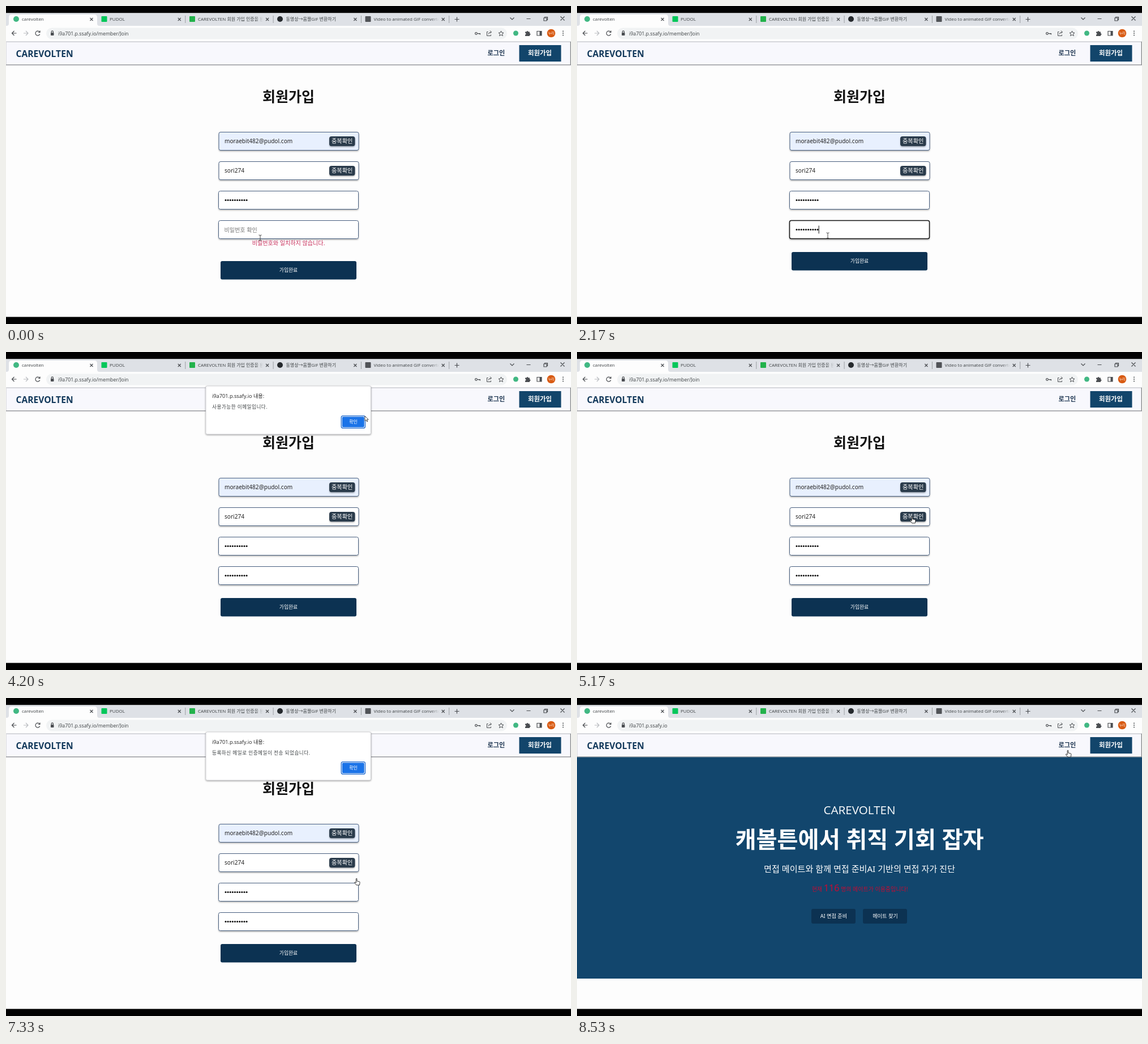
Write an HTML page that moves like this. It is 998 px wide and 561 px high and loops after 8.56 s.

```html
<!DOCTYPE html>
<html lang="ko">
<head>
<meta charset="utf-8">
<title>carevolten</title>
<style>
html, body { margin: 0; width: 100%; height: 100%; overflow: hidden; background: #000; }
svg { display: block; width: 998px; height: 561px; }
text { font-family: "Noto Sans", "Noto Sans CJK KR", "Noto Sans CJK", sans-serif; white-space: pre; }
.ui { font-family: "Open Sans", "Noto Sans CJK KR", "Noto Sans CJK", sans-serif; fill: #3c4043; }
.brand { font-family: "Open Sans", sans-serif; }
.mid { text-anchor: middle; }
.bold { font-weight: 600; }
.white { fill: #fff; }
.icon { fill: none; stroke: #4a4d51; stroke-width: 1.2; }
.field { stroke: #4a6180; stroke-width: 1; }
.focus { stroke: #161616; stroke-width: 1.5; }
</style>
</head>
<body>
<svg viewBox="0 0 998 561">
  <defs>
    <linearGradient id="fade"><stop offset="0" stop-color="#dee1e6" stop-opacity="0"/><stop offset="1" stop-color="#dee1e6"/></linearGradient>
    <filter id="soft" x="-10%" y="-20%" width="120%" height="150%"><feDropShadow dx="0" dy="1.5" stdDeviation=".9" flood-opacity=".3"/></filter>
    <filter id="lift" x="-10%" y="-20%" width="120%" height="150%"><feDropShadow dx="0" dy="1" stdDeviation="1.6" flood-opacity=".45"/></filter>
    <clipPath id="page"><rect y="62" width="998" height="486.500"/></clipPath>
  </defs>
  <rect width="998" height="561"/>
  <rect y="12.500" width="998" height="536" fill="#fdfdfd"/>

  <g id="chrome">
    <rect y="12.500" width="998" height="22.500" fill="#dee1e6"/>
    <path d="M1 35q4 0 4-4V20q0-5 5-5H156q5 0 5 5V31q0 4 4 4z" fill="#fdfdfd"/>
    <g id="tabs"></g>
    <path class="icon" d="M792.500 23.500h8M796.500 19.500v8"/>
    <path class="icon" d="M890.500 20.500l3.500 3.500 3.500-3.500M919.500 22.500h7M950 21h5v5h-5zM951.500 21v-1.500h5v5H955M979.500 18.500l7 7m0-7l-7 7"/>
    <rect x="71" y="38.500" width="814" height="20" rx="10" fill="#f1f3f4"/>
    <path class="icon" d="M18.500 48h-8m4-4l-4 4 4 4"/>
    <path class="icon" d="M31 48h8m-4-4l4 4-4 4" style="stroke:#b9bcc0"/>
    <path class="icon" d="M59.500 46a4 4 0 1 0 .3 3.500M60 43.500v3h-3"/>
    <rect x="79" y="47" width="5.500" height="5" rx=".7" fill="#4a4d51"/>
    <path class="icon" d="M80.200 47v-1.500a1.600 1.600 0 0 1 3.200 0V47"/>
    <text id="url" class="ui" x="92" y="52" font-size="8.800"></text>
    <g class="icon">
      <circle cx="830.500" cy="48.500" r="1.900"/>
      <path d="M832.500 48.500h5v2m-2-2v1.500"/>
      <path d="M851.500 45.500h-2v7h7v-2M852 50q.5-4 5-4m-2-2.500l2.500 2.500-2.500 2.500" stroke-width="1"/>
      <path d="M874.500 44l1.300 3 3.200.3-2.400 2.100.8 3.200-2.900-1.700-2.900 1.700.8-3.200-2.400-2.100 3.200-.3z" stroke-width="1"/>
      <path d="M938 44.500h8v7.500h-8z"/>
    </g>
    <circle cx="900.500" cy="48" r="4.500" fill="#41b883"/>
    <path d="M917 45.500h2.500a1.500 1.500 0 0 1 3 0H925v2.800a1.500 1.500 0 0 1 0 3v1.700h-8v-2.500a1.500 1.500 0 0 0 0-3z" fill="#4a4d51"/>
    <path d="M942.500 44.500H946V52h-3.500z" fill="#4a4d51"/>
    <circle cx="963" cy="48" r="7.300" fill="#d85a12"/>
    <text class="mid white" x="963" y="50.200" font-size="5.800">누리</text>
    <g fill="#4a4d51"><circle cx="984" cy="44.500" r="1"/><circle cx="984" cy="48" r="1"/><circle cx="984" cy="51.500" r="1"/></g>
  </g>

  <g clip-path="url(#page)">
    <rect y="62.500" width="998" height="42" fill="#f8f8fd"/>
    <path d="M0 63.200H998" stroke="#c2c3c8" stroke-width="1.200"/>
    <path d="M.5 63v40" stroke="#dcdce0"/>
    <path d="M0 103.800H997.300V63" fill="none" stroke="#86888b" stroke-width="1.300"/>
    <text class="brand" x="17.500" y="90" font-size="15.600" font-weight="700" fill="#143a5c">CAREVOLTEN</text>
    <text class="bold" x="850.500" y="87" font-size="11.200" fill="#1c3450">로그인</text>
    <rect x="906.500" y="69" width="74" height="29" fill="#12456b"/>
    <text class="mid white bold" x="943" y="87" font-size="11.400">회원가입</text>

    <g id="join">
      <text class="mid bold" x="499" y="168.500" font-size="25" fill="#111">회원가입</text>
      <g id="fields"></g>
      <text id="hint" x="385.500" y="398.500" font-size="10.100" fill="#777">비밀번호 확인</text>
      <path id="caret" stroke="#111" stroke-width="1"/>
      <text id="error" class="mid" x="499" y="422" font-size="10.100" fill="#c9305c">비밀번호와 일치하지 않습니다.</text>
      <g id="submit">
        <rect x="379" y="450" width="240" height="32.500" rx="3" fill="#0c3252"/>
        <text class="mid white" x="499" y="469.200" font-size="8.800">가입완료</text>
      </g>
    </g>

    <g id="home">
      <rect y="104.400" width="998" height="390.600" fill="#12466d"/>
      <text class="mid white brand" x="499" y="205" font-size="20.600">CAREVOLTEN</text>
      <text class="mid white bold" x="499" y="264" font-size="40.300">캐볼튼에서 취직 기회 잡자</text>
      <text class="mid white" x="499" y="307" font-size="15.100">면접 메이트와 함께 면접 준비AI 기반의 면접 자가 진단</text>
      <text class="mid" x="499.500" y="341" font-size="10" fill="#c80a32">현재 <tspan font-size="16.200">116</tspan> 명의 메이트가 이용중입니다!</text>
      <g fill="#0c3252"><rect x="414" y="372" width="78" height="26" rx="3"/><rect x="505" y="372" width="78" height="26" rx="3"/></g>
      <text class="mid white" x="453.500" y="388.200" font-size="9.200">AI 면접 준비</text>
      <text class="mid white" x="544.500" y="388.200" font-size="9.200">메이트 찾기</text>
    </g>
  </g>

  <g id="dialog">
    <rect x="353" y="60" width="291.500" height="85" rx="2.500" fill="#fff" stroke="#b5b8bc" stroke-width=".6" filter="url(#lift)"/>
    <text class="ui" x="364" y="81" font-size="9.200" style="fill:#222">i9a701.p.ssafy.io 내용:</text>
    <text id="message" class="ui" x="364" y="100" font-size="8.600" letter-spacing=".5"></text>
    <rect x="592.200" y="112.700" width="42.300" height="21.600" rx="3" fill="#fff" stroke="#1a66cc" stroke-width="1.300"/>
    <rect id="ok" x="593.800" y="114.300" width="39" height="18.400" rx="2"/>
    <text class="mid white" x="613.500" y="126.200" font-size="8">확인</text>
  </g>

  <g id="cursor" stroke-linejoin="round">
    <path id="ibeam" d="M-2.500-5q2 0 2.500 1q.5-1 2.500-1M0-4V4M-2.500 5q2 0 2.500-1q.5 1 2.500 1" fill="none" stroke="#333" stroke-width=".9"/>
    <path id="arrow" d="M0 0V8.500L2 6.700 3.500 9.900 4.900 9.300 3.500 6.200H6.200z" fill="#fff" stroke="#222" stroke-width=".8"/>
    <path id="hand" d="M-.8.800q.8-1.200 1.600 0V5l4.200.9q1 .3.9 1.300L5.300 12H-.2L-3.400 8q-.5-1.200.8-1.200L-.8 8z" fill="#fff" stroke="#222" stroke-width=".9"/>
  </g>
</svg>
<script>
const LOOP = 8560;
const $ = id => document.getElementById(id);
const show = (id, on) => { $(id).style.display = on ? '' : 'none'; };

// Tab strip: text x, title, icon centre, icon colour, round icon
const tabs = [
  [28, 'carevolten', 18, '#41b883', 1],
  [183, 'PUDOL', 173.5, '#03c75a', 0],
  [339, 'CAREVOLTEN 회원 가입 인증을 완료', 329, '#23b24b', 0],
  [494.5, '동영상→움짤GIF 변환하기', 484, '#25292d', 1],
  [649.5, 'Video to animated GIF converter', 639.5, '#505357', 0]
];
$('tabs').innerHTML = tabs.map(([x, title, cx, color, round], i) => {
  const close = 151 + i * 155.3, end = close - 8;
  const cut = i === 2 || i === 4;
  return `<rect x="${cx - 5}" y="18" width="10" height="10" rx="${round ? 5 : 1}" fill="${color}"/>
    <svg x="${x}" y="12" width="${end - x}" height="23" style="width:${end - x}px;height:23px"><text class="ui" y="14" font-size="8">${title}</text></svg>
    ${cut ? `<rect x="${end - 14}" y="14" width="15" height="19" fill="url(#fade)"/>` : ''}
    <path class="icon" d="M${close - 2.5} 21l5 5m0-5l-5 5"/>
    ${i ? `<path d="M${close + 10.5} 17v13" stroke="#9a9da2"/>` : ''}`;
}).join('');

const dots = (id, y) => `<g id="${id}" fill="#111">` +
  Array.from({length: 10}, (_, i) => `<circle cx="${388 + i * 4.12}" cy="${y}" r="1.55"/>`).join('') + '</g>';
const values = ['moraebit482@pudol.com', 'sori274'];
$('fields').innerHTML = [0, 1, 2, 3].map(i => {
  const y = 222.5 + i * 52, x = i < 2 ? 376 : 375.5;
  const box = `<rect id="box${i}" class="field" x="${x}" y="${y}" width="247" height="32" rx="3" fill="${i ? '#fff' : '#e8f0fe'}" filter="url(#soft)"/>`;
  if (i > 1) return box + dots('dots' + i, y + 16);
  return box + `<text x="386" y="${y + 19.8}" font-size="10.1" fill="#222">${values[i]}</text>
    <rect x="571" y="${y + 7.5}" width="45.500" height="17.300" rx="4" fill="#2c3b4b" filter="url(#soft)"/>
    <text class="mid white" x="593.700" y="${y + 19.8}" font-size="10.200">중복확인</text>`;
}).join('');

const FOCUS = 420, BLUR = 3520, HOME = 7860;
const KEY_START = 720, KEY_STEP = 110, KEY_END = KEY_START + 9 * KEY_STEP;
const alerts = [
  [3660, 4600, '사용가능한 이메일입니다.'],
  [5420, 6220, '사용가능한 닉네임입니다.'],
  [7120, 7740, '등록하신 메일로 인증메일이 전송 되었습니다.']
];

// Pointer stops: time, x, y
const path = [
  [0, 449, 409], [60, 449, 409], [400, 443, 405], [2250, 443, 405], [3270, 570, 246],
  [3430, 590, 241], [3720, 590, 241], [4200, 634, 113], [4440, 615, 124], [4640, 615, 124],
  [5180, 592, 290], [5480, 592, 290], [5960, 602, 126], [6260, 602, 126], [6820, 624, 448],
  [7155, 624, 448], [7560, 612, 125], [7920, 612, 125], [8440, 867, 92], [LOOP, 867, 92]
];
function pointer(t) {
  const i = path.findIndex(p => p[0] > t);
  const [t0, x0, y0] = path[i - 1], [t1, x1, y1] = path[i];
  const u = (t - t0) / (t1 - t0), s = u * u * (3 - 2 * u);
  return [x0 + (x1 - x0) * s, y0 + (y1 - y0) * s];
}

const inside = (x, y, l, t, r, b) => x > l && x < r && y > t && y < b;
function cursorKind(x, y, open, home) {
  if (open) return inside(x, y, 353, 60, 644, 145) ? 'arrow' : 'hand';
  if (home) return inside(x, y, 845, 72, 890, 100) ? 'hand' : 'arrow';
  const row = (y - 222) % 52;
  if (inside(x, y, 571, 230, 617, 300) && row > 7 && row < 26) return 'hand';
  if (inside(x, y, 379, 434, 625, 467)) return 'hand';
  return inside(x, y, 375, 222, 623, 411) && row < 33 ? 'ibeam' : 'arrow';
}

function draw(t) {
  const typed = Math.max(0, Math.min(10, Math.floor((t - KEY_START) / KEY_STEP) + 1));
  const focused = t >= FOCUS && t < BLUR;
  const home = t >= HOME;
  const open = alerts.find(a => t >= a[0] && t < a[1]);

  show('join', !home);
  show('home', home);
  $('url').textContent = 'i9a701.p.ssafy.io' + (home ? '' : '/member/Join');

  [...$('dots3').children].forEach((dot, i) => { dot.style.display = i < typed ? '' : 'none'; });
  show('hint', typed === 0);
  show('error', typed < 10);
  $('submit').setAttribute('transform', `translate(0 ${typed < 10 ? 0 : -16})`);
  $('box3').setAttribute('class', focused ? 'focus' : 'field');

  const lastKey = typed ? Math.min(KEY_END, KEY_START + (typed - 1) * KEY_STEP) : FOCUS;
  show('caret', focused && (t - lastKey) % 1000 < 500);
  $('caret').setAttribute('d', `M${386 + typed * 4.12} 387.500v14`);

  const [x, y] = pointer(t);
  show('dialog', open);
  if (open) $('message').textContent = open[2];
  $('ok').setAttribute('fill', inside(x, y, 593, 114, 633, 133) ? '#3b84e6' : '#1a73e8');

  const kind = cursorKind(x, y, open, home);
  for (const id of ['ibeam', 'arrow', 'hand']) show(id, id === kind);
  $('cursor').setAttribute('transform', `translate(${x} ${y})`);
}

const start = performance.now();
function tick() {
  draw((performance.now() - start) % LOOP);
  requestAnimationFrame(tick);
}
tick();
</script>
</body>
</html>
```
